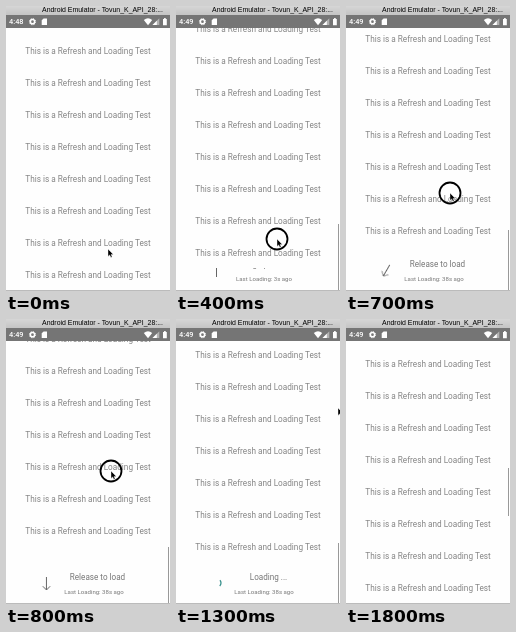
These frames come from a looping animation (164x285 px, 2 s). An HTML page:

```html
<!DOCTYPE html>
<html lang="en">
<head>
<meta charset="utf-8">
<title>Refresh and Loading</title>
<style>
html, body { margin: 0; width: 100%; height: 100%; overflow: hidden; background: #fff; }
#stage { position: relative; width: 164px; height: 285px; overflow: hidden; background: #fefefe; font-family: Roboto, sans-serif; color: #858585; }
#stage > *, .footer > * { position: absolute; }
#stage *, #stage { box-sizing: border-box; }

/* Every part holds its pose for 100 ms = 5% of the loop. */
.anim { animation: 2s step-end infinite; }

.title { left: 0; top: 0; width: 164px; height: 9px; background: linear-gradient(#d6d6d6, #c4c4c4); color: #000; font: 6.95px/8px "Liberation Sans", Arial, sans-serif; padding-left: 36px; white-space: nowrap; }
.status { left: 0; top: 9px; width: 164px; height: 13px; background: #757575; }
.clock { left: 3px; top: 9px; font-size: 7.4px; font-weight: 500; line-height: 13px; color: #fff; }
.before { animation-name: before; }
.after { animation-name: after; }
.icons { left: 0; top: 9px; }
.edge { left: 0; top: 284px; width: 164px; height: 1px; background: #bbb; }

.list { left: 0; top: 0; width: 164px; height: 284px; padding-top: 29px; background: #fefefe; font-size: 8.22px; line-height: 32px; text-align: center; white-space: nowrap; animation-name: pull; }
.footer { left: 0; top: 0; width: 164px; height: 285px; white-space: nowrap; }
.label { left: 41.5px; top: 252.5px; width: 100px; text-align: center; font-size: 8.15px; line-height: 11px; color: #777; }
.ago { left: 38px; top: 267px; width: 100px; text-align: center; font-size: 6.06px; line-height: 11px; color: #777; }
.drag { animation-name: drag; }
.release { animation-name: release; }
.loading { left: 42.5px; animation-name: loading; }
.early { animation-name: drag; }
.late { animation-name: late; }
.arrow { left: 32px; top: 256px; animation-name: turn; }
.spinner { left: 33px; top: 256px; animation-name: loading; }
.spinner path { fill: none; stroke: #37908c; stroke-width: 1.3; stroke-dasharray: 0 100; animation-name: sweep; }
.bar { left: 162px; top: 0; width: 1px; height: 70px; background: #999; animation-name: bar; }
.pointer { left: 0; top: 0; overflow: visible; animation-name: pointer; }
.ring { animation-name: press; }

@keyframes before { 0% { opacity: 1 } 10%, 100% { opacity: 0 } }
@keyframes after { 0% { opacity: 0 } 10%, 100% { opacity: 1 } }
@keyframes pull {
  0%, 5% { transform: none }
  10% { transform: translateY(-7px) }
  15% { transform: translateY(-15px) }
  20% { transform: translateY(-22px) }
  25% { transform: translateY(-26px) }
  30% { transform: translateY(-30px) }
  35% { transform: translateY(-44px) }
  40% { transform: translateY(-57px) }
  45% { transform: translateY(-63px) }
  50% { transform: translateY(-45px) }
  55%, 65% { transform: translateY(-41px) }
  70% { transform: translateY(-30px) }
  75% { transform: translateY(-10px) }
  80%, 100% { transform: none }
}
@keyframes drag { 0% { opacity: 1 } 35%, 100% { opacity: 0 } }
@keyframes release { 0% { opacity: 0 } 35% { opacity: 1 } 50%, 100% { opacity: 0 } }
@keyframes loading { 0% { opacity: 0 } 50%, 100% { opacity: 1 } }
@keyframes late { 0% { opacity: 0 } 35%, 100% { opacity: 1 } }
@keyframes turn {
  0% { transform: none; opacity: 1 }
  30% { transform: rotate(-60deg); opacity: 1 }
  35% { transform: rotate(-150deg); opacity: 1 }
  40% { transform: rotate(-180deg); opacity: 1 }
  50%, 100% { transform: rotate(-180deg); opacity: 0 }
}
/* Dash lengths are percentages of the circle, clockwise from the top. */
@keyframes sweep {
  0%, 50% { stroke-dasharray: 42 58; stroke-dashoffset: -27 }
  55% { stroke-dasharray: 50 50; stroke-dashoffset: -45 }
  60% { stroke-dasharray: 30 70; stroke-dashoffset: -65 }
  65% { stroke-dasharray: 25 75; stroke-dashoffset: -13 }
  70%, 100% { stroke-dasharray: 45 55; stroke-dashoffset: -35 }
}
@keyframes bar {
  0% { transform: translateY(285px) }
  5% { transform: translateY(211px) }
  10% { transform: translateY(213px) }
  15% { transform: translateY(216px) }
  20% { transform: translateY(218px) }
  25% { transform: translateY(219px) }
  30% { transform: translateY(221px) }
  35% { transform: translateY(224px) }
  40% { transform: translateY(228px) }
  45% { transform: translateY(230px) }
  50%, 65% { transform: translateY(224px); height: 70px }
  70%, 100% { transform: translateY(149px); height: 48px }
}
@keyframes pointer {
  0%, 5% { transform: translate(102px, 243px) }
  10% { transform: translate(101px, 240px) }
  15% { transform: translate(101px, 236px) }
  20% { transform: translate(101px, 233px) }
  25% { transform: translate(102px, 228px) }
  30% { transform: translate(103px, 221px) }
  35% { transform: translate(104px, 187px) }
  40% { transform: translate(105px, 152px) }
  45% { transform: translate(105px, 124px) }
  50% { transform: translate(105px, 106px) }
  55% { transform: translate(117px, 101px) }
  60% { transform: translate(142px, 94px) }
  65% { transform: translate(162px, 89px) }
  70%, 100% { transform: translate(180px, 85px) }
}
@keyframes press { 0% { opacity: 0 } 5% { opacity: 1 } 50%, 100% { opacity: 0 } }
</style>
</head>
<body>
<div id="stage">
  <div class="footer">
    <div class="label anim drag">Drag up to load</div>
    <div class="label anim release">Release to load</div>
    <div class="label anim loading">Loading ...</div>
    <div class="ago anim early">Last Loading: 3s ago</div>
    <div class="ago anim late">Last Loading: 38s ago</div>
    <svg class="arrow anim" width="17" height="17" fill="none" stroke="#666" stroke-width="1"><path d="M8.5 15V2M4.8 5.8 8.5 2l3.7 3.8"/></svg>
    <svg class="spinner anim" width="16" height="16"><path class="anim" pathLength="100" d="M8 4a4 4 0 1 1 0 8a4 4 0 1 1 0-8"/></svg>
  </div>
  <div class="list anim"></div>
  <div class="bar anim"></div>
  <div class="edge"></div>
  <div class="title">Android Emulator - Tovun_K_API_28:...</div>
  <div class="status"></div>
  <div class="clock anim before">4:48</div>
  <div class="clock anim after">4:49</div>
  <svg class="icons" width="164" height="13" fill="#fff">
    <circle cx="26.5" cy="6.7" r="2.1" fill="none" stroke="#fff" stroke-width="1.5"/>
    <circle cx="26.5" cy="6.7" r="3.1" fill="none" stroke="#fff" stroke-width="1" stroke-dasharray="1.2 1.23"/>
    <path d="M37.6 3.5H41V10H35.7V5.3z"/>
    <path d="M137.8 4.9Q142 1.8 146.2 4.9L142 10.2z"/>
    <path d="M153.3 3.2V10H146.5z" opacity=".45"/>
    <path d="M150.8 5.7V10H146.5z"/>
    <path d="M157 4h1.1V3h1.6v1h1.1v6.2H157z"/>
  </svg>
  <svg class="pointer anim" width="1" height="1">
    <circle class="ring anim" r="10.5" fill="none" stroke="#000" stroke-width="1.8"/>
    <path d="M0 0V7.4L1.7 5.9 2.9 8.5 4.1 7.9 3.1 5.4H5.3z" fill="#000" stroke="#fff" stroke-width=".4"/>
  </svg>
</div>
<script>
const list = document.querySelector('.list');
for (let i = 0; i < 8; i++) {
  const row = document.createElement('div');
  row.textContent = 'This is a Refresh and Loading Test';
  list.append(row);
}
</script>
</body>
</html>
```
